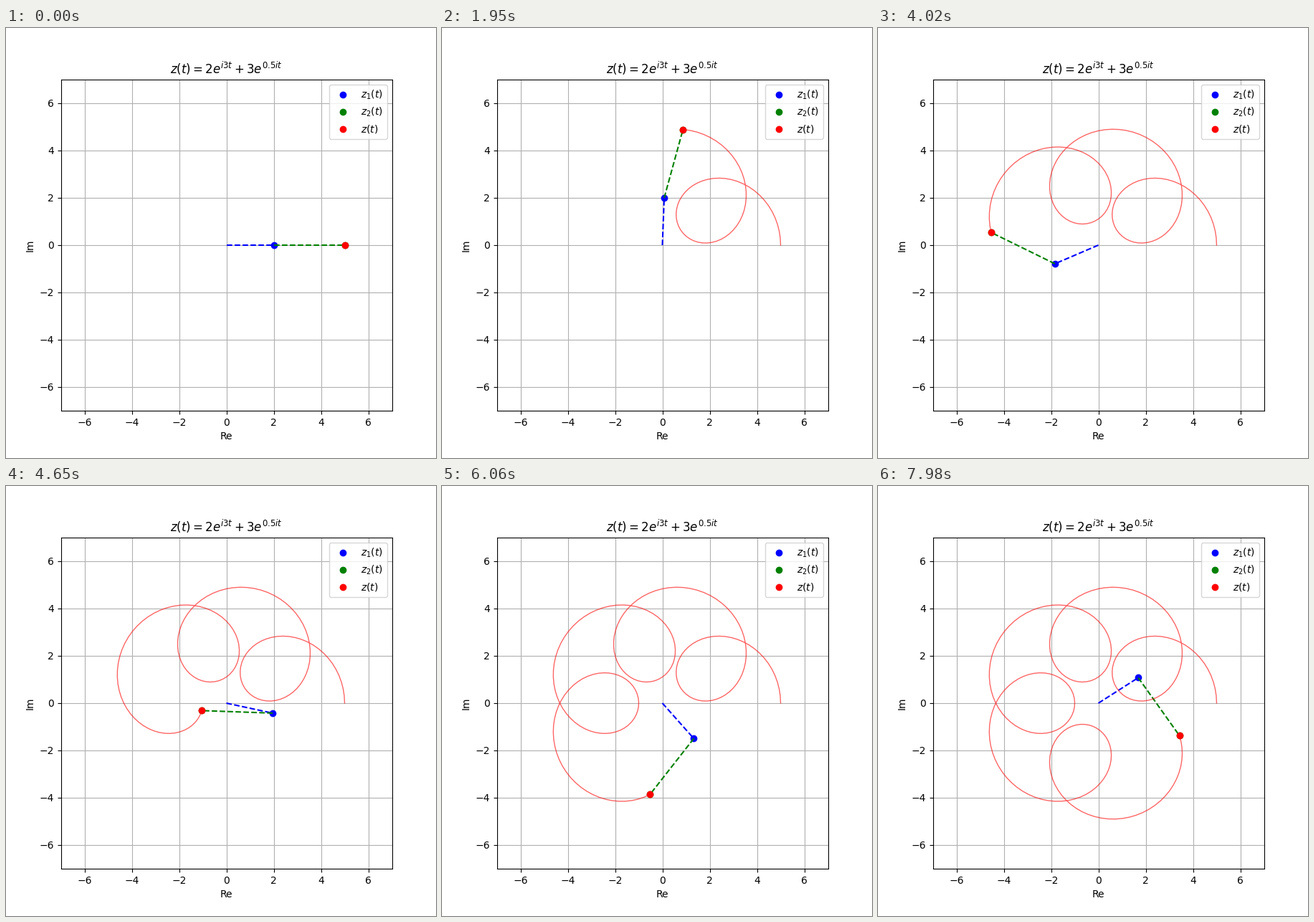
Animation of 600 by 600 pixels, one loop 8 s. Source, as a matplotlib script:

```python
import numpy as np
import matplotlib.pyplot as plt
from matplotlib.animation import FuncAnimation

FRAMES = 267
INTERVAL = 30  # ms

t = np.linspace(0, 20, 500)[:FRAMES]
z1 = 2 * np.exp(3j * t)
z2 = 3 * np.exp(0.5j * t)
z = z1 + z2

fig, ax = plt.subplots(figsize=(6, 6), dpi=100)
ax.set_xlim(-7, 7)
ax.set_ylim(-7, 7)
ax.set_aspect("equal")
ax.grid(True)
ax.set_xlabel("Re")
ax.set_ylabel("Im")
ax.set_title(r"$z(t) = 2e^{i3t} + 3e^{0.5it}$")

arm1, = ax.plot([], [], "b--")
dot1, = ax.plot([], [], "bo", label=r"$z_1(t)$")
arm2, = ax.plot([], [], "g--")
dot2, = ax.plot([], [], "go", label=r"$z_2(t)$")
trail, = ax.plot([], [], "r-", lw=1, alpha=0.6)
tip, = ax.plot([], [], "ro", label=r"$z(t)$")
ax.legend(loc="upper right")


def place(line, points):
    points = np.atleast_1d(points)
    line.set_data(points.real, points.imag)


def update(i):
    place(arm1, [0, z1[i]])
    place(dot1, z1[i])
    place(arm2, [z1[i], z[i]])
    place(dot2, z[i])
    place(trail, z[:i + 1])
    place(tip, z[i])
    return arm1, dot1, arm2, dot2, trail, tip


anim = FuncAnimation(fig, update, frames=FRAMES, interval=INTERVAL,
                     init_func=lambda: update(0), repeat=True, repeat_delay=0)
plt.show()
```
